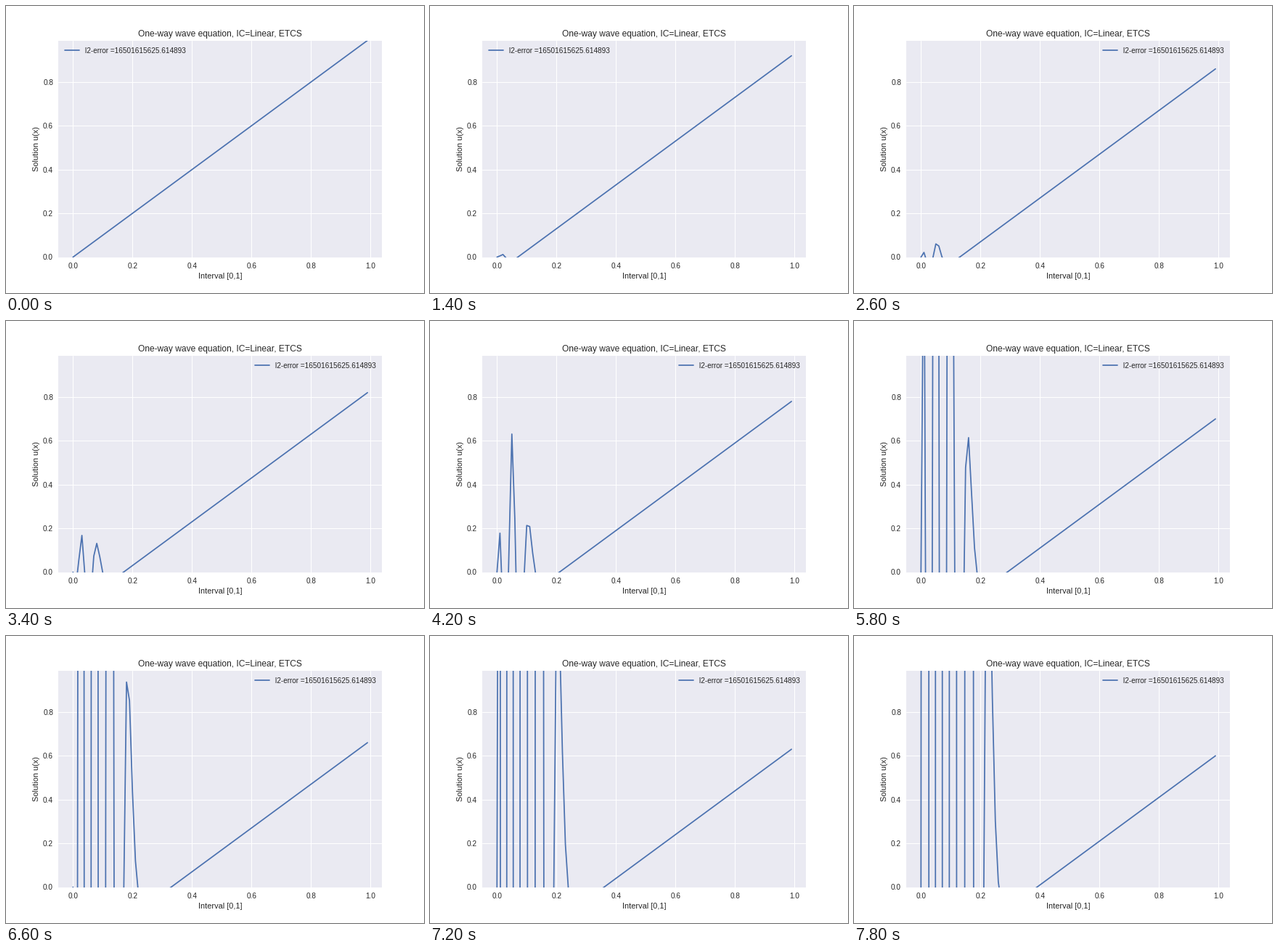
A matplotlib script for the animation above (8000 ms loop, 576 px wide and 396 px high).

```python
import matplotlib.pyplot as plt
import numpy as np
from matplotlib.animation import FuncAnimation

STEPS = 40
POINTS = 100
COURANT = 1.0
INK = "0.15"

plt.rcParams.update({
    "font.family": "Liberation Sans",
    "font.size": 10,
    "text.color": INK,
    "axes.facecolor": "#EAEAF2",
    "axes.edgecolor": "white",
    "axes.labelcolor": INK,
    "axes.linewidth": 0,
    "axes.axisbelow": True,
    "axes.grid": True,
    "axes.titlesize": 12,
    "axes.labelsize": 11,
    "grid.color": "white",
    "grid.linestyle": "-",
    "grid.linewidth": 1,
    "lines.linewidth": 1.75,
    "lines.solid_capstyle": "round",
    "legend.frameon": False,
    "legend.fontsize": 10,
    "xtick.color": INK,
    "ytick.color": INK,
    "xtick.labelsize": 10,
    "ytick.labelsize": 10,
    "xtick.major.size": 0,
    "ytick.major.size": 0,
    "xtick.major.pad": 7,
    "ytick.major.pad": 7,
})


def advance(u):
    """One explicit step, centred in space; fixed inflow, one-sided outflow."""
    new = u.copy()
    new[1:-1] -= COURANT / 2 * (u[2:] - u[:-2])
    new[-1] -= COURANT * (u[-1] - u[-2])
    return new


x = np.arange(POINTS) / POINTS
history = [x.copy()]
for _ in range(STEPS - 1):
    history.append(advance(history[-1]))

fig = plt.figure(figsize=(8, 5.5), dpi=72, facecolor="white")
ax = fig.add_axes([0.125, 0.125, 0.775, 0.755])
line, = ax.plot(x, history[0], color="#4C72B0",
                label="l2-error =16501615625.614893")
ax.set_xticks(np.arange(6) / 5)
ax.set_yticks(np.arange(5) / 5)
margin = 0.05 * x[-1]
ax.set_xlim(-margin, x[-1] + margin)
ax.set_ylim(0, x[-1])
ax.set_title("One-way wave equation, IC=Linear, ETCS")
ax.set_xlabel("Interval [0,1]")
ax.set_ylabel("Solution u(x)")
ax.legend(loc="best")


def draw(step):
    line.set_ydata(history[step])
    return line,


anim = FuncAnimation(fig, draw, frames=STEPS, interval=200,
                     repeat=True, repeat_delay=0, blit=False)
plt.show()
```
